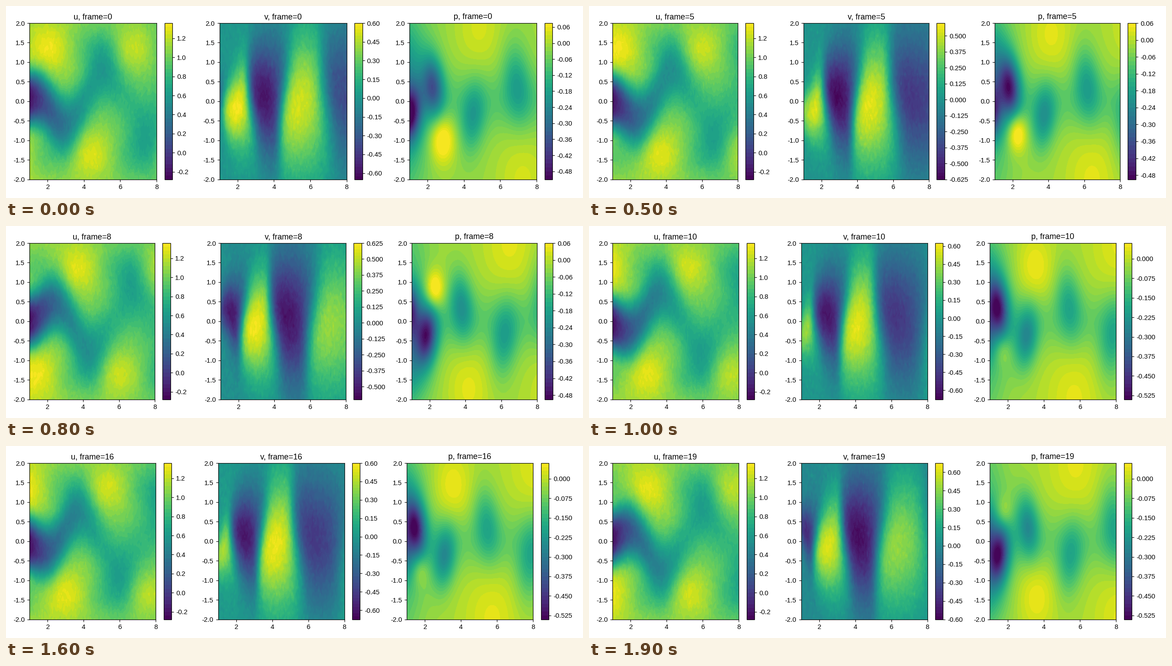
Recreate the animation shown at these times as a matplotlib script. Size 1280 px wide and 427 px high, loop 2000 ms.

```python
import math

import matplotlib.pyplot as plt
import numpy as np
from matplotlib.animation import FuncAnimation

W, H, DPI = 1280, 427, 128
FRAMES, INTERVAL = 20, 100
HALF_PERIOD = 2.965          # half a shedding cycle, in frames
OMEGA = math.pi / 3          # half a cycle is three units of flow time
TOP, BOTTOM = 38, 385.5      # vertical extent of every panel, in pixels
NOISE = 0.018

plt.rcParams.update({
    "font.family": "Liberation Sans",
    "font.size": 8.333,
    "axes.titlesize": 10,
    "axes.titlepad": 5,
    "axes.linewidth": 0.667,
    "axes.unicode_minus": False,
})
for axis in ("xtick", "ytick"):
    plt.rcParams.update({f"{axis}.major.size": 2.917,
                         f"{axis}.major.width": 0.667,
                         f"{axis}.major.pad": 2.917})

X, Y = np.meshgrid(np.linspace(1, 8, 100), np.linspace(-2, 2, 50))


def bump(x, y, sx, sy):
    return np.exp(-(x / sx) ** 2 - (y / sy) ** 2)


def u_field(t):
    """Free stream minus a meandering wake, faster outside its bends."""
    theta = OMEGA * (t - 1.2 - 1.27 * (X - 1.45))
    centre = 0.68 * np.tanh((X / 2.8) ** 2) * np.cos(theta)
    deficit = 0.22 + 1.16 * np.exp(-(X - 1) / 2.4)
    deficit = deficit * (1 - 0.35 * (1 - np.exp(-(X / 5) ** 4)) * np.sin(theta) ** 2)
    width = 0.68 + 0.035 * (X - 1)
    power = 2 + np.exp(1 - X)
    wake = deficit * np.exp(-np.abs((Y - centre) / width) ** power)
    rim = np.sign(Y) * np.exp(-((np.abs(Y) - 1.35) / 0.6) ** 2)
    return 1.14 - 0.022 * (X - 1) - 0.2 * rim * np.cos(theta - 1.05) - wake


def v_field(t):
    """Alternating bands that lean, widen and fade downstream."""
    tau = -1 + 1.821 * (X - 1.4) - 0.098 * (X - 1.4) * (X - 4.2)
    theta = OMEGA * (t - tau)
    lean = (0.9 - 0.07 * X) * np.tanh(Y) * np.cos(theta - math.pi / 4)
    band = np.tanh(1.5 * np.cos(theta + lean)) / math.tanh(1.5)
    strength = 0.65 * np.tanh((X - 0.45) / 0.9) * np.exp(-(X / 11) ** 2)
    spread = 1.85 * np.tanh(X / 3.4)
    return strength * band * np.exp(-((Y + 0.4 / X * np.cos(theta)) / spread) ** 2)


def vortex(a, side):
    """Pressure low of age a, speeding up as it leaves the body."""
    x = 0.23 + 0.57 * a + 0.25 * math.hypot(a - 3, 1.5)
    amp = 0.13 + 0.2 * math.exp(-((a - 1.4) / 2.6) ** 2)
    dy = side * Y - 0.37 - 0.012 * a
    return amp * bump(X - x + 0.15 * dy, dy, 0.52 + 0.025 * a, 0.65 + 0.037 * a)


def crest(a, side):
    """Pressure high of age a, growing wide and drifting outwards."""
    x = 2.8 + 0.62 * a + 0.02 * a * a
    y = 1.35 + 0.65 * math.tanh((a - 1.2) / 1.6)
    amp = 0.055 + 0.12 * math.exp(-((a + 0.6) / 1.2) ** 2)
    amp *= (1 + math.tanh(2 * (a + 2.5))) / 2
    size = 0.95 + 0.55 * math.tanh((a - 1) / 2)
    return amp * bump(X - x, side * Y - y, size, 0.92 * size)


def p_field(t):
    p = -0.02 - 0.06 * np.exp(-(Y / 0.8) ** 2) - 0.25 * bump(X - 0.6, Y, 1.3, 2)
    flank = np.sign(Y) * bump(X - 0.8, np.abs(Y) - 1.3, 1, 0.7)
    p = p + 0.05 * flank * math.cos(OMEGA * (t - 1.8))
    for side, start in ((-1, t), (1, t + 3)):
        for cycle in (-1, 0, 1):
            age = start % 6 + 6 * cycle
            if -3 <= age < 12:
                p = p + crest(age, side) - vortex(age, side)
    return p


def scale(low, high, step):
    """Levels covering low..high, colour bar ticks and their decimals."""
    n = np.arange(math.floor(low / step), math.ceil(high / step) + 1)
    every = math.ceil(len(n) / 10)
    decimals = next(d for d in range(1, 5)
                    if abs(round(every * step, d) - every * step) < 1e-9)
    return n * step, n[n % every == 0] * step, decimals


def scales(t):
    """Colour scales of u, v and p; the extremes pulse every half cycle."""
    def pulse(mean, swing, peak):
        return mean + swing * math.cos(2 * OMEGA * (t - peak))

    v = (-pulse(0.612, 0.042, 0.3), pulse(0.625, 0.04, 1.3))
    if int(t // 3) % 2:
        v = (-v[1], -v[0])
    return (scale(-0.27, 1.35, 0.04),
            scale(*v, 0.025),
            scale(-pulse(0.507, 0.026, 0.88), pulse(0.057, 0.012, 0), 0.015))


fig = plt.figure(figsize=(W / DPI, H / DPI), dpi=DPI, facecolor="white")


def add_axes(left, width):
    return fig.add_axes([left / W, 1 - BOTTOM / H, width / W, (BOTTOM - TOP) / H])


def draw(i):
    fig.clear()
    t = i * 3 / HALF_PERIOD
    rng = np.random.default_rng(100 + i)
    fields = (u_field(t) + rng.normal(0, NOISE, X.shape),
              v_field(t) + rng.normal(0, NOISE, X.shape),
              p_field(t))
    bars = scales(t)
    # Longer bar labels squeeze the panels.
    v_long, p_long = bars[1][2] - 2, bars[2][2] - 2
    width = 282 - 4 * v_long - 2 * p_long
    pitch = 421.5 + 2.5 * v_long - 3 * p_long
    for k, (name, z, (levels, ticks, decimals)) in enumerate(zip("uvp", fields, bars)):
        left = 52 + k * pitch
        ax = add_axes(left, width)
        z = np.clip(z, levels[0] + 1e-6, levels[-1] - 1e-6)
        filled = ax.contourf(X, Y, z, levels=levels, cmap="viridis")
        ax.set(xlim=(1, 8), ylim=(-2, 2), xticks=range(2, 9, 2),
               yticks=np.arange(-2, 2.1, 0.5), title=f"{name}, frame={i}")
        ax.yaxis.set_major_formatter("{x:.1f}")
        bar = add_axes(left + width * 17 / 16, (BOTTOM - TOP) / 20)
        fig.colorbar(filled, cax=bar, ticks=ticks, format=f"%.{decimals}f")
    return []


anim = FuncAnimation(fig, draw, frames=FRAMES, interval=INTERVAL,
                     repeat=True, repeat_delay=0, blit=False)
plt.show()
```
